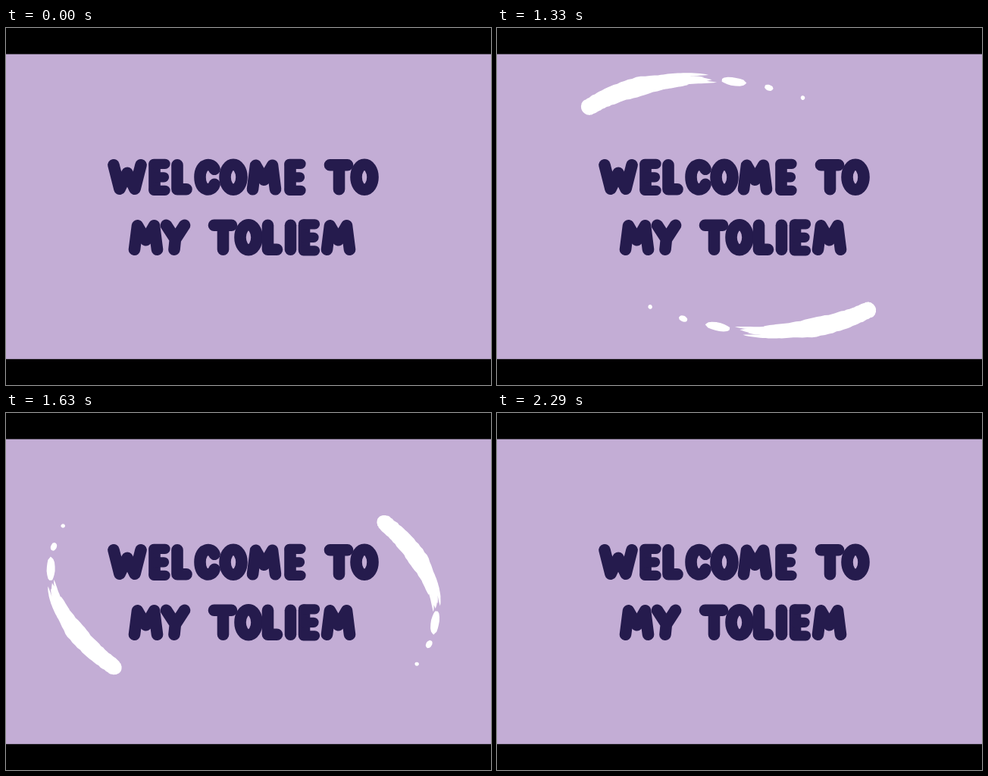
Animation of 640x471 px, one loop 2930 ms. Source, as an HTML page:

```html
<!DOCTYPE html>
<html lang="en">
<head>
<meta charset="utf-8">
<title>Welcome</title>
<style>
html, body { margin: 0; width: 100%; height: 100%; overflow: hidden; background: #000; }
svg { display: block; width: 100%; height: 100%; }
#words path { fill: none; stroke: #251b4d; stroke-linecap: round; stroke-linejoin: round; }
#brush path { fill: #fff; }
</style>
</head>
<body>
<svg viewBox="0 0 640 471" role="img" aria-label="WELCOME TO MY TOLIEM">
  <rect width="640" height="471"/>
  <rect y="34.5" width="640" height="402.3" fill="#c3add5"/>
  <g id="words"></g>
  <g id="brush"><path/><path/></g>
</svg>
<script>
const NS = 'http://www.w3.org/2000/svg';
const LOOP = 2930;
const TICK = 1000 / 24;
const START = 1000, PAUSE = 2000, RESUME = 2125, END = 2290;

// Bubble letters: advance, stroked skeleton, thinner arms.
const GLYPHS = {
  ' ': [22.5, ''],
  W: [54, 'M8 8.5L16 40L26 19L36 40L44 8.5'],
  E: [30, 'M8 8.5V40.5', 'M7 7H22M8 24.5H20.5M7 42H22'],
  L: [30, 'M8 8.5V40.5H20'],
  C: [33, 'M27 14C24 5 8 5 8 24.5S24 44 27 34'],
  O: [36.5, 'M19 8A11 16.5 0 0 1 19 41A11 16.5 0 0 1 19 8Z'],
  M: [49.5, 'M8 40.5L12 9L23 28L34 9L38 40.5'],
  T: [34.5, 'M8 8.5H31M20 10V40.5'],
  I: [18, 'M8 8.5V40.5'],
  Y: [33, 'M.5 8.5L12.5 27L24.5 8.5M12.5 26L11 40.5']
};

const words = document.getElementById('words');
function write(text, x, y) {
  for (const ch of text) {
    const [advance, ...parts] = GLYPHS[ch];
    parts.forEach((d, i) => {
      const p = document.createElementNS(NS, 'path');
      p.setAttribute('d', d);
      p.setAttribute('stroke-width', i ? 13.3 : 15.6);
      p.setAttribute('transform', `translate(${x} ${y})`);
      words.append(p);
    });
    x += advance;
  }
}
write('WELCOME TO', 134, 172.3);
write('MY TOLIEM', 161.5, 251.8);

const noise = n => { const s = Math.sin(n * 127.1 + 3.7) * 43758.5453; return s - Math.floor(s); };
const shape = pts => 'M' + pts.map(p => p[0].toFixed(1) + ' ' + p[1].toFixed(1)).join('L') + 'Z';
const mix = (a, b, k) => a + (b - a) * k;
const surge = (t, mid, power) => 1 / (1 + (mid / Math.max(t, 1)) ** power);

// Point and unit tangent on the slanted oval; side -1 is the opposite half.
function at(deg, side) {
  const a = deg * Math.PI / 180, slant = .18;
  const dx = -254 * Math.sin(a) * side, dy = -166 * Math.cos(slant - a) * side;
  const len = Math.hypot(dx, dy);
  return {
    x: 313 + side * 254 * Math.cos(a),
    y: 234 + side * 166 * Math.sin(slant - a),
    tx: dx / len, ty: dy / len
  };
}

// Band along the oval; profile(v) gives its centre offset and half width.
function band(from, to, side, profile) {
  const left = [], right = [], count = 44;
  for (let i = 0; i <= count; i++) {
    const v = Math.sin(i / count * Math.PI / 2);
    const p = at(mix(from, to, v), side);
    const [off, half] = profile(v);
    const edge = (sign, seed) => {
      const o = off + sign * half * (1 + (noise(seed) - .5) * .08);
      return [p.x - p.ty * o, p.y + p.tx * o];
    };
    left.push(edge(-1, i + 9));
    right.unshift(edge(1, i + 71));
  }
  return shape(left.concat(right));
}

function drop(deg, side, rx, ry) {
  const p = at(deg, side), pts = [];
  for (let i = 0; i < 18; i++) {
    const a = i / 9 * Math.PI, r = 1 + (noise(i) - .5) * .14;
    const x = rx * r * Math.cos(a), y = ry * r * Math.sin(a);
    pts.push([p.x + x * p.tx - y * p.ty, p.y + x * p.ty + y * p.tx]);
  }
  return shape(pts);
}

function brush(t, side) {
  // The head rushes ahead and the tail catches up; the lower brush lags a little.
  const lag = side < 0 ? 5 : 0;
  const head = 84 - lag + 178 * surge(t, 408, 3.6);
  const tail = 77 - lag + 185 * surge(t, 568, 4);
  const span = head - tail;
  const fade = Math.min(1, (END - START - t) / (END - PAUSE));
  const w = (7 + span * .13) * fade;
  const a = at(tail, side), b = at(head, side);
  const cap = Math.min(.5, w * .85 / Math.hypot(b.x - a.x, b.y - a.y));

  let d = band(tail, head, side, v => {
    const rise = Math.min(1, v / .5) ** .75;
    const narrow = 1 - .2 * Math.max(0, v * 2 - 1);
    const end = Math.max(0, (v - 1 + cap) / cap);
    return [0, w * rise * narrow * Math.sqrt(Math.max(0, 1 - end * end))];
  });

  // Dry bristles fray the tail.
  if (span > 15) {
    for (let i = 0; i < 5; i++) {
      const off = (i / 2 - 1) * w * .7;
      const from = tail + span * (noise(i + 20) * .2 - .04);
      d += band(from, tail + span * .55, side,
        v => [off * mix(.7, 1, v), w * .17 * Math.sin(Math.PI * v ** .7)]);
    }
  }

  // Droplets trail behind, each shorter than the last.
  for (let i = 1; i <= 3; i++) {
    const rx = (.4 * span / i ** 1.3 - 1.5) * fade;
    if (rx > 1.4) d += drop(tail + 4 - 10.5 * i, side, rx, Math.min(rx, 5.5 / Math.sqrt(i)));
  }
  return d;
}

const [upper, lower] = document.querySelectorAll('#brush path');
const begin = performance.now();
function draw() {
  const now = (performance.now() - begin) % LOOP;
  let t = Math.floor((now + 5) / TICK) * TICK;
  if (t > PAUSE && t < RESUME - 1) t = PAUSE;
  const visible = now >= START && now < END;
  upper.setAttribute('d', visible ? brush(t - START, 1) : '');
  lower.setAttribute('d', visible ? brush(t - START, -1) : '');
  requestAnimationFrame(draw);
}
draw();
</script>
</body>
</html>
```
